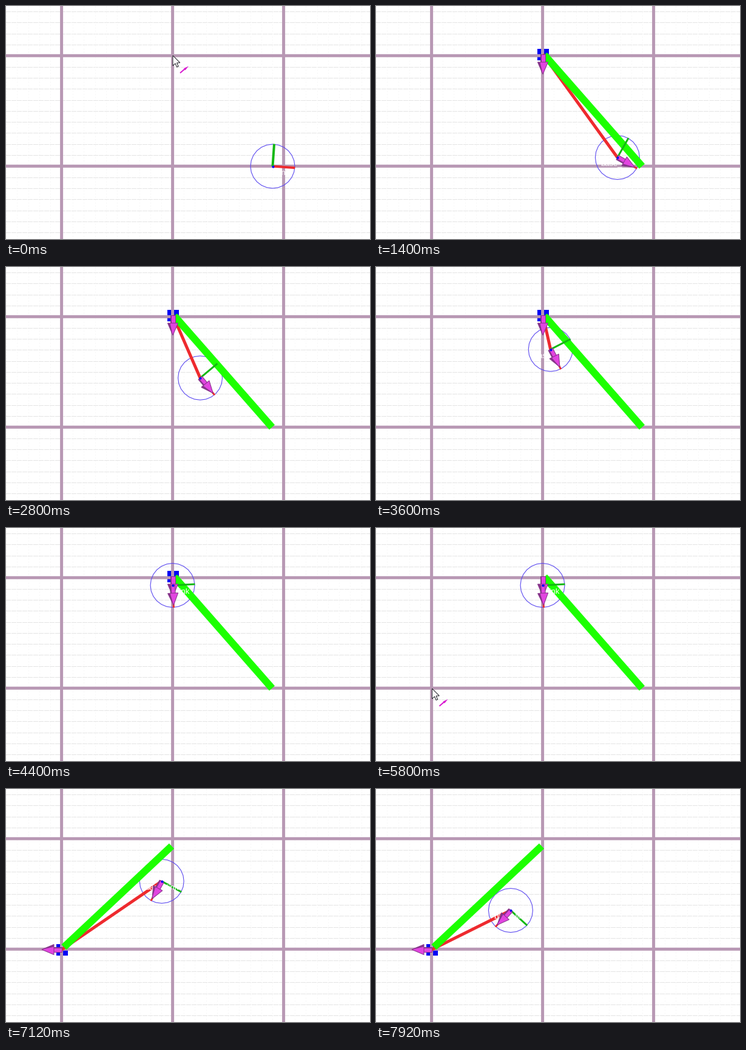
A matplotlib script that plays this animation: 600 px wide and 386 px high, repeating every 8 s.

```python
import numpy as np
import matplotlib.pyplot as plt
from matplotlib.animation import FuncAnimation

W, H, DPI = 600, 386, 100
PX = 72 / DPI
STEP_MS, LOOP_MS, DRIVE_MS = 40, 8000, 3750
CELL, RADIUS, AXIS = 183, 36.5, 37
GRID, MAGENTA, SHADE = "#b898b4", "#e244e0", "#86348a"
LIME, RED, BLUE, PINK = "#1cff00", "#ee2a2e", "#0000f4", "#d818d0"
X0, Y0 = 91.6, 82.3  # first crossing of the coarse grid

fig = plt.figure(figsize=(W / DPI, H / DPI), dpi=DPI, facecolor="white")
ax = fig.add_axes([0, 0, 1, 1])
ax.set_xlim(0, W)
ax.set_ylim(H, 0)
ax.axis("off")


def unit(deg):
    a = np.radians(deg)
    return np.array([np.cos(a), np.sin(a)])


def turn(pts, pos, deg):
    u = unit(deg)
    return np.asarray(pts) @ np.array([u, (-u[1], u[0])]) + pos


def line(color, width, z, xs=(), ys=(), **kw):
    return ax.plot(xs, ys, color=color, lw=width * PX, zorder=z,
                   solid_capstyle="butt", **kw)[0]


def poly(color, z, edge="none"):
    return ax.fill([0, 0, 0], [0, 0, 0], fc=color, ec=edge, lw=PX,
                   zorder=z)[0]


def segment(artist, a, b):
    artist.set_data(*zip(a, b))


class Plan:
    """A goal set with the pointer, then a curved drive towards it."""

    def __init__(self, press, begin, corner, facing, pose, end, trace, gear):
        self.press, self.begin = press, begin
        self.corner, self.facing = np.array(corner), facing
        self.trace = trace
        pos, deg, reach_out = pose
        last, last_deg, reach_in = end
        a, d = np.array(pos), np.array(last)
        self.knots = (a, a + gear * reach_out * unit(deg),
                      d - gear * reach_in * unit(last_deg), d)
        self.gear = gear  # -1 drives backwards

    def pose(self, t):
        s = np.clip((t - self.begin) / DRIVE_MS, 0, 1)
        a, b, c, d = self.knots
        r = 1 - s
        pos = r**3 * a + 3 * r * r * s * b + 3 * r * s * s * c + s**3 * d
        vx, vy = self.gear * (r * r * (b - a) + 2 * r * s * (c - b)
                              + s * s * (d - c))
        return pos, np.degrees(np.arctan2(vy, vx))

    def pointer(self, t):
        rise = np.clip((self.press - 600 - t) / 650, 0, 1) ** 2
        drag = 0.35 * max(t - self.press, 0)
        return self.corner + rise * np.array([80, 140]) \
            + drag * unit(self.facing)


PLANS = [
    Plan(250, 620, (275, 82), 90, ((439.5, 265.5), 4, 60),
         ((274.5, 95), 87, 60), ((438.5, 265.5), (277.5, 81)), -1),
    Plan(5840, 5960, (92.5, 266), 180, ((274.5, 95), 87, 50),
         ((92, 266), 180, 105), ((273, 94.5), (95.5, 262)), 1),
]
SQUARE_OFF = 5000


class Arrow:
    """Cylinder shaft and cone head, each with a shaded side."""

    def __init__(self, z):
        self.polys = [poly(c, z + i / 10, e) for i, (c, e) in
                      enumerate([(MAGENTA, SHADE), (SHADE, "none")] * 2)]

    def place(self, pos, deg):
        shapes = [[(0, y), (15, y), (15, 4), (0, 4)] for y in (-4, 2)]
        shapes += [[(13, y), (33, 0), (13, 8.5)] for y in (-8.5, 4.5)]
        for p, pts in zip(self.polys, shapes):
            p.set_xy(turn(pts, pos, deg))


# fine and coarse floor grid
for k in range(-5, 30):
    x, y = X0 + k * CELL / 10, Y0 + k * CELL / 10
    line("#f7f7f7", 1, 0, (x, x), (0, H), ls=(0, (2, 3)))
    line("#e4e4e4", 1, 0, (0, W), (y, y), ls=(0, (7, 1.5)),
         antialiased=False)
for k in range(3):
    line(GRID, 5, 2, [X0 + k * CELL] * 2, (0, H), snap=False)
    line(GRID, 5, 2, (0, W), [Y0 + k * CELL] * 2, snap=False)

square = poly(BLUE, 1)
circle = line("#5a48f0", 1.1, 3)
red_path = line(RED, 5, 4)
green_path = line(LIME, 12, 5)
axis_x = line(RED, 4, 6)
axis_y = line("#14b814", 4, 6)
label = ax.text(0, 0, "base_link", family="Liberation Sans", size=13 * PX,
                color="white", ha="center", va="baseline", zorder=7)
goal_arrow, robot_arrow = Arrow(8), Arrow(9)
hub = line(BLUE, 1, 10, marker="o", ms=4 * PX, mew=0)
pointer = poly("white", 12, "#202028")
badge = line(PINK, 2, 12)
badge_head = poly(PINK, 12)

POINTER = np.array([(0, 0), (0, 17), (4, 13.2), (6.6, 19.2), (9.2, 18),
                    (6.6, 12.2), (11.8, 12)])
BOX = 9.5 * np.array([(-1, -1), (1, -1), (1, 1), (-1, 1)])
RING = np.column_stack(unit(np.linspace(0, 360, 25))).T
PLAN_ARTISTS = [red_path, green_path, *goal_arrow.polys, *robot_arrow.polys]


def draw_robot(pos, deg):
    circle.set_data(*(pos[:, None] + RADIUS * RING))
    segment(axis_x, pos, pos + AXIS * unit(deg))
    segment(axis_y, pos, pos + AXIS * unit(deg - 90))
    label.set_position(pos + (0, 13.5))
    robot_arrow.place(pos, deg)
    hub.set_data(*pos[:, None])


def draw_plan(plan, t, pos):
    active = t >= plan.begin
    for artist in PLAN_ARTISTS:
        artist.set_visible(active)
    square.set_visible(active and not SQUARE_OFF < t < PLANS[1].begin)
    for axis in (axis_x, axis_y):
        axis.set_linewidth((3 if active else 4) * PX)
    goal = np.round(plan.corner - (0, 2 * unit(plan.facing)[1]))
    square.set_xy(BOX + goal)
    goal_arrow.place(goal, plan.facing)
    segment(green_path, *plan.trace)
    segment(red_path, goal, pos)


def draw_pointer(tip):
    pointer.set_xy(POINTER + tip)
    segment(badge, tip + (12, 29), tip + (20, 22))
    badge_head.set_xy([tip + p for p in ((18, 21.5), (26, 17.5), (20.5, 24.5))])


def draw(i):
    # the view refreshes at 15 Hz
    t = (i * STEP_MS * 3 // 200) * 200 / 3
    plan = PLANS[t >= PLANS[1].begin]
    pos, deg = plan.pose(t)
    draw_robot(pos, deg)
    draw_plan(plan, t, pos)
    draw_pointer(PLANS[t > SQUARE_OFF - 1000].pointer(t))
    return []


anim = FuncAnimation(fig, draw, frames=LOOP_MS // STEP_MS,
                     init_func=lambda: draw(0), interval=STEP_MS,
                     repeat=True, repeat_delay=0, blit=False)
plt.show()
```
